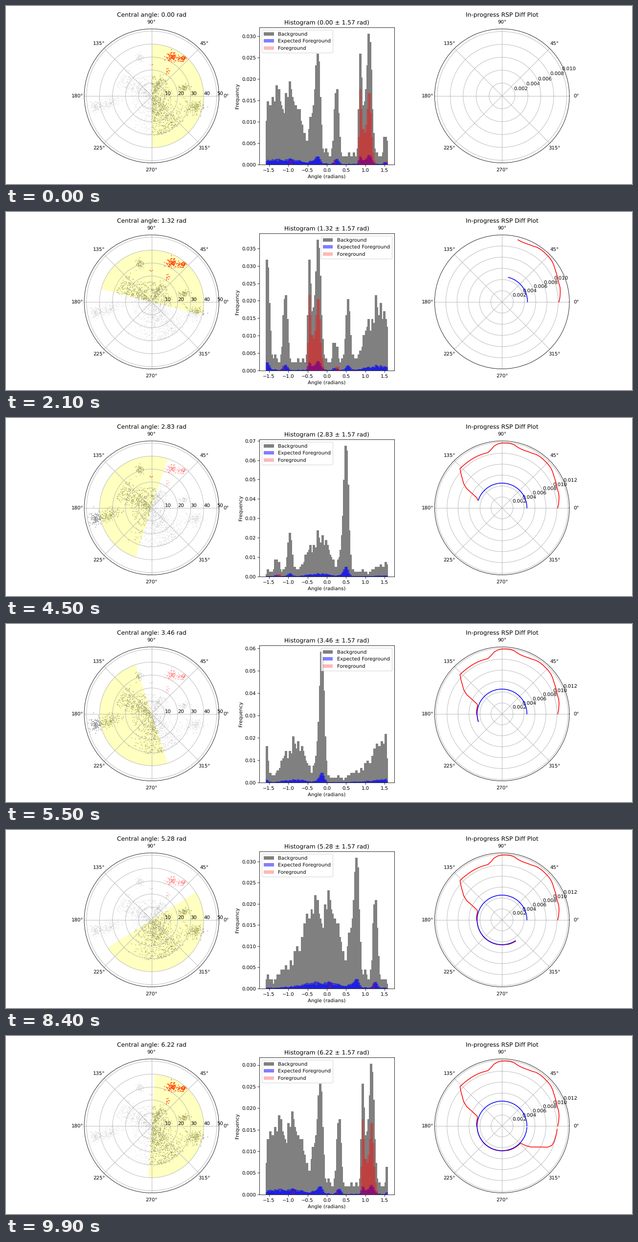
A matplotlib script that plays this animation: 1280 px wide and 366 px high, repeating every 10000 ms.

```python
import numpy as np
import matplotlib.pyplot as plt
from matplotlib.animation import FuncAnimation
from matplotlib.colors import to_rgba

FRAMES, INTERVAL = 100, 100
DPI = 73.14285715
BIN = np.pi / 100
HALF = np.pi / 2
FG_RATIO = 0.075
EXPECTED_RADIUS = 0.00453
LIFT = 0.0056

plt.rcParams.update({"font.family": "DejaVu Sans", "text.hinting": "none"})
rng = np.random.default_rng(7)

# Loose points: angle, angular spread, points per bin, outer radius.
FANS = [(0, 100, 2.5, 15), (-1.15, 0.45, 18, 30), (2.6, 0.25, 16, 27)]
# Dense clumps: angle, angular spread, points per bin, radius, radial spread.
CLUMPS = [
    (-0.33, 0.08, 10, 33, 3), (-0.22, 0.05, 20, 35, 2.8), (0.25, 0.05, 17, 25, 2.5),
    (0.88, 0.05, 6, 10, 4), (1.09, 0.07, 12, 10, 4), (1.52, 0.04, 6, 10, 3),
    (1.87, 0.045, 16, 31.3, 2), (3.2, 0.06, 6, 32, 4),
    (3.33, 0.055, 26, 34, 4), (3.33, 0.055, 26, 43.5, 2.8),
]
FOREGROUND = [
    (0.87, 0.025, 20, 37.3, 1.4), (0.94, 0.03, 7, 35, 1.5),
    (1.0, 0.04, 3, 22.8, 1.8), (1.1, 0.055, 19, 34, 2.3),
    (-0.93, 0.02, 1.2, 27, 2), (0.2, 0.02, 1.2, 25.5, 0.5), (1.6, 0.04, 1, 24, 0.4),
]

centers = -HALF + (np.arange(200) + 0.5) * BIN


def bell(angle, spread, height):
    offset = np.angle(np.exp(1j * (centers - angle)))
    return height * np.exp(-0.5 * (offset / spread) ** 2)


def scatter_in_bins(counts):
    angles = np.repeat(centers, counts)
    return angles + rng.uniform(-0.5, 0.5, angles.size) * BIN


def make_fan(angle, spread, height, reach):
    noise = rng.uniform(0.45, 1.1, centers.size)
    counts = np.rint(bell(angle, spread, height) * noise).astype(int)
    theta = scatter_in_bins(counts)
    return counts, theta, 1 + reach * rng.random(theta.size) ** 0.7


def make_clump(angle, spread, height, radius, radial_spread):
    counts = np.rint(bell(angle, spread, height)).astype(int)
    theta = scatter_in_bins(counts)
    r = np.clip(rng.normal(radius, radial_spread, theta.size), 1, 49.3)
    return counts, theta, r


def merge(groups):
    counts, theta, r = zip(*groups)
    return sum(counts), np.concatenate(theta), np.concatenate(r)


bg_counts, bg_theta, bg_r = merge(
    [make_fan(*fan) for fan in FANS] + [make_clump(*clump) for clump in CLUMPS])
fg_counts, fg_theta, fg_r = merge([make_clump(*clump) for clump in FOREGROUND])
all_counts = bg_counts + fg_counts


def window(i):
    """Indices of the bins within a quarter turn of the central angle."""
    return (np.arange(100) + 2 * i) % 200


# The red curve rises with the foreground's share of the points in view.
phis = np.arange(FRAMES) * 2 * np.pi / FRAMES
shares = np.array([fg_counts[window(i)].sum() / all_counts[window(i)].sum()
                   for i in range(FRAMES)])
red_r = EXPECTED_RADIUS + LIFT * shares / shares[0]
blue_r = np.full(FRAMES, EXPECTED_RADIUS)

fig = plt.figure(figsize=(17.5, 5.00390625), dpi=DPI)
fig.subplots_adjust(left=0.125, right=0.9, bottom=0.11, top=0.88, wspace=0.3)
ax_sky = fig.add_subplot(131, projection="polar")
ax_hist = fig.add_subplot(132)
ax_diff = fig.add_subplot(133, projection="polar")

ax_sky.set_ylim(0, 51.76)
ax_sky.set_yticks([10, 20, 30, 40, 50])
ax_sky.set_rlabel_position(0)
# Each group with its colour and its dot sizes inside and outside the window.
dots = [
    (ax_sky.scatter(theta, r, linewidths=0), theta, color, near, far)
    for theta, r, color, near, far in [(bg_theta, bg_r, "gray", 2.4, 1.1),
                                       (fg_theta, fg_r, "red", 3.6, 1.8)]
]
wedge = ax_sky.bar(0, 40, width=np.pi, color="yellow", alpha=0.25, zorder=1.2)[0]

bar_x = -HALF + (np.arange(100) + 0.5) * BIN


def make_bars(color, alpha, label):
    return ax_hist.bar(bar_x, np.zeros(100), width=2 * BIN, color=color,
                       alpha=alpha, label=label)


bars_bg = make_bars("gray", 1, "Background")
bars_expected = make_bars("blue", 0.5, "Expected Foreground")
bars_fg = make_bars("red", 0.28, "Foreground")
edge = (HALF + BIN / 2) * 1.1
ax_hist.set_xlim(-edge, edge)
ax_hist.set_xlabel("Angle (radians)")
ax_hist.set_ylabel("Frequency")
legend = ax_hist.legend(loc="upper left")

ax_diff.set_title("In-progress RSP Diff Plot")
red_line, = ax_diff.plot([], [], "r")
blue_line, = ax_diff.plot([], [], "b")


def set_heights(bars, heights):
    for bar, height in zip(bars, heights):
        bar.set_height(height)


def draw_sky(phi):
    ax_sky.set_title(f"Central angle: {phi:.2f} rad")
    wedge.set_x(phi - HALF)
    for points, theta, color, near, far in dots:
        inside = np.cos(theta - phi) >= 0
        rgba = np.tile(to_rgba(color), (theta.size, 1))
        rgba[:, 3] = np.where(inside, 1, 0.5)
        points.set_facecolors(rgba)
        points.set_sizes(np.where(inside, near, far))


def draw_hist(i, phi):
    seen = window(i)
    total = all_counts[seen].sum()
    heights = all_counts[seen] / total
    set_heights(bars_bg, heights)
    set_heights(bars_expected, heights * FG_RATIO)
    set_heights(bars_fg, fg_counts[seen] / total)
    ax_hist.set_ylim(0, 1.05 * heights.max())
    ax_hist.set_title(f"Histogram ({phi:.2f} ± 1.57 rad)")
    # The legend goes to the side with fewer tall bars.
    tall = heights > 0.85 * heights.max()
    crowded_right = (tall & (bar_x > -0.19)).sum() > (tall & (bar_x < 0.19)).sum()
    legend.set_loc("upper left" if crowded_right else "upper right")


def draw_diff(i):
    seen = slice(0, i + 1)
    red_line.set_data(phis[seen], red_r[seen])
    blue_line.set_data(phis[seen], blue_r[seen])
    top = red_r[seen].max()
    r_max = top + 0.05 * (top - EXPECTED_RADIUS)
    ax_diff.set_yticks(np.arange(0.002, r_max, 0.002))
    ax_diff.set_ylim(0, r_max)


def draw(i):
    phi = phis[i]
    draw_sky(phi)
    draw_hist(i, phi)
    draw_diff(i)
    return []


anim = FuncAnimation(fig, draw, frames=FRAMES, interval=INTERVAL,
                     init_func=lambda: draw(0), repeat=True, repeat_delay=0)
plt.show()
```
